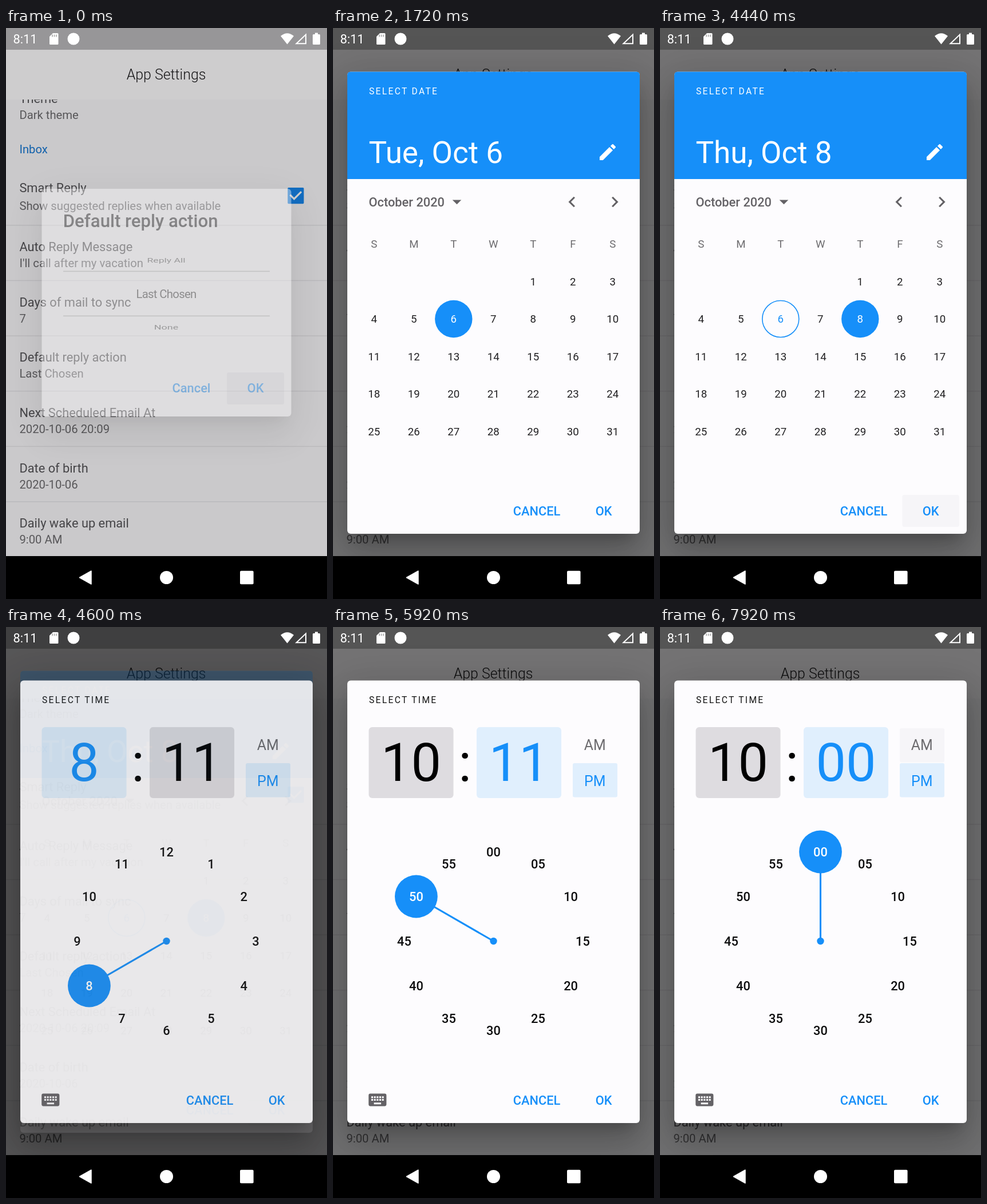
An HTML page for the animation above (8 s loop, 561 by 998 pixels).

```html
<!DOCTYPE html>
<html lang="en">
<head>
<meta charset="utf-8">
<title>Settings pickers</title>
<style>
  html, body { margin: 0; width: 100%; height: 100%; overflow: hidden; background: #000; }
  svg { display: block; width: 561px; height: 998px; font-family: Roboto, "Noto Sans", sans-serif; }
</style>
</head>
<body>
<svg id="stage" viewBox="0 0 561 998" xmlns="http://www.w3.org/2000/svg"></svg>
<script>
const LOOP = 8000, STEP = 40;
const DP = 561 / 360;
const BLUE = '#168ff9', PALE = '#e0effd', GREY = '#dedce0', PAPER = '#fdfcfe';
const INK = '#555457', SOFT = '#6c6b6e', ICON = '#646266', PRESSED = '#f6f5f8';
const HUB = { x: 280.5, y: 549 }, REACH = 156, KNOB = 24 * DP;
const stage = document.getElementById('stage');

const range = n => [...Array(n).keys()];
const many = (list, draw) => list.map(draw).join('');
const lerp = (a, b, p) => a + (b - a) * p;
const clamp = v => Math.min(1, Math.max(0, v));

const text = (x, y, str, size, fill, { weight = 400, anchor = 'start', gap = 0, extra = '' } = {}) =>
  `<text x="${x}" y="${y}" font-size="${size * DP}" fill="${fill}" font-weight="${weight}" text-anchor="${anchor}" letter-spacing="${gap}" ${extra}>${str}</text>`;
const mid = (x, y, str, size, fill, weight = 400) => text(x, y, str, size, fill, { weight, anchor: 'middle' });
const box = (x, y, w, h, fill, r = 0, extra = '') =>
  `<rect x="${x}" y="${y}" width="${w}" height="${h}" fill="${fill}" rx="${r}" ${extra}/>`;
const disc = (x, y, r, fill, extra = '') => `<circle cx="${x}" cy="${y}" r="${r}" fill="${fill}" ${extra}/>`;
const shape = (d, fill, extra = '') => `<path d="${d}" fill="${fill}" ${extra}/>`;
const icon = (x, y, d, fill) => shape(d, fill, `transform="translate(${x} ${y}) scale(${DP}) translate(-12 -12)"`);
const layer = (opacity, body) => opacity > 0 ? `<g opacity="${opacity}">${body}</g>` : '';
const scrim = opacity => box(0, 0, 561, 923, '#000', 0, `opacity="${opacity}"`);

// Elevation shadow made of three blurred layers, then the sheet itself.
function sheet(x, y, w, h, level = 1) {
  const shade = (name, drop, grow, alpha) =>
    box(x - grow, y - grow + drop, w + 2 * grow, h + 2 * grow, '#000', 8, `opacity="${alpha * level}" filter="url(#${name})"`);
  return shade('blurS', 17, -11, .2) + shade('blurM', 37, 5, .14) + shade('blurL', 14, 12, .12) + box(x, y, w, h, PAPER, 6);
}

const blur = (id, size) =>
  `<filter id="${id}" filterUnits="userSpaceOnUse" x="-150" y="-150" width="861" height="1300"><feGaussianBlur stdDeviation="${size}"/></filter>`;
const DEFS = `<defs>${blur('blurS', 12)}${blur('blurM', 30)}${blur('blurL', 36)}</defs>`;

const PENCIL = 'M3 17.25V21h3.75L17.81 9.94l-3.75-3.75L3 17.25zM20.71 7.04c.39-.39.39-1.02 0-1.41l-2.34-2.34c-.39-.39-1.02-.39-1.41 0l-1.83 1.83 3.75 3.75 1.83-1.83z';
const LEFT = 'M15.41 7.41L14 6l-6 6 6 6 1.41-1.41L10.83 12z';
const RIGHT = 'M10 6L8.59 7.41 13.17 12l-4.58 4.59L10 18l6-6z';
const key = (x, y) => `M${x} ${y}v2h2v-2z`;
const KEYBOARD = 'M4 5h16a2 2 0 0 1 2 2v10a2 2 0 0 1-2 2H4a2 2 0 0 1-2-2V7a2 2 0 0 1 2-2zM8 15v2h8v-2z' +
  many([5, 8, 11, 14, 17], x => key(x, 8) + key(x, 11));

const ROWS = [
  ['Auto Reply Message', "I'll call after my vacation"],
  ['Days of mail to sync', '7'],
  ['Default reply action', 'Last Chosen'],
  ['Next Scheduled Email At', '2020-10-06 20:09'],
  ['Date of birth', '2020-10-06'],
  ['Daily wake up email', '9:00 AM'],
];

function settings() {
  const title = (y, s) => text(23.4, y, s, 14, INK);
  const note = (y, s) => text(23.4, y, s, 13, SOFT);
  return box(0, 0, 561, 923, '#f8f7fa') +
    title(131, 'Theme') + note(159, 'Dark theme') + text(23.4, 219, 'Inbox', 13, '#1577d3') +
    title(287, 'Smart Reply') + note(318, 'Show suggested replies when available') +
    box(492.3, 279, 28.2, 28.2, '#1686ee', 1.6) +
    shape('M496.5 291.7l7 7 12.6-12.6', 'none', 'stroke="#fff" stroke-width="3.1"') +
    many(ROWS, ([name, value], i) => {
      const y = 96.65 * i;
      return box(0, 344 + y, 561, 1.5, '#e5e4e7') + title(390 + y, name) + note(418 + y, value);
    }) +
    box(0, 38, 561, 87, PAPER) + text(280, 90, 'App Settings', 16, '#1d1c1e', { weight: 300, anchor: 'middle' }) +
    box(0, 0, 561, 38, '#bab9bb');
}

function statusBar() {
  return text(12.5, 27, '8:11', 14, '#fff') +
    shape('M82 9h8q1.500 0 1.500 1.500v17q0 1.500-1.500 1.500h-12.500q-1.500 0-1.500-1.500v-12.500z', '#fff') +
    many([81, 84.5, 88], x => box(x - .8, 11.500, 1.7, 4, '#aaa')) +
    disc(118, 19, 10.5, '#fff') +
    shape('M491.500 28.500L480 14q11.500-9.500 23 0z', '#fff') +
    shape('M507.500 27.300H524V11.500z', 'none', 'stroke="#fff" stroke-width="2"') +
    shape('M540 8.500h5v2.500h2.500q1.500 0 1.500 1.500v15q0 1.500-1.500 1.500h-10q-1.500 0-1.500-1.500v-15q0-1.500 1.500-1.500h2.500z', '#fff');
}

function navBar() {
  return box(0, 923, 561, 75, '#000') +
    shape('M128.500 960.500L149 949v23z', '#fff', 'stroke="#fff" stroke-width="1.5" stroke-linejoin="round"') +
    disc(280.5, 960.5, 11.5, '#fff') + box(409, 948.7, 23.6, 23.6, '#fff', 2);
}

function replyDialog() {
  const wheel = (y, str, size, squash) =>
    `<g transform="translate(280 ${y}) scale(1 ${squash})">${mid(0, 0, str, size, '#555')}</g>`;
  return sheet(62.5, 281, 436, 398, .8) +
    text(99.7, 348, 'Default reply action', 20, '#222', { weight: 500 }) +
    wheel(409.5, 'Reply All', 11.3, .63) + wheel(526.5, 'None', 11.5, .63) +
    text(280, 472, 'Last Chosen', 13, '#333', { anchor: 'middle', gap: -.64 }) +
    box(100, 424.5, 361, 1.6, '#bbb') + box(100, 502.5, 361, 1.6, '#bbb') +
    box(386, 602, 100, 56, '#ecebee', 3) +
    mid(324, 637, 'Cancel', 14, BLUE, 500) + mid(436, 637, 'OK', 14, BLUE, 500);
}

const actions = y => mid(356, y, 'CANCEL', 14, BLUE, 500) + mid(473.2, y, 'OK', 14, BLUE, 500);

function datePicker(t) {
  const picked = t < 3240 ? 6 : 8;
  const column = i => 280.3 + (i - 3) * 69.5;
  const place = day => [column((day + 3) % 7), 443 + 65.45 * Math.floor((day + 3) / 7)];
  const ripple = t < 3240 ? 0 : .27 * clamp(1 - (t - 3240) / 160);
  const press = clamp((t - 4360) / 80);
  const [px, py] = place(picked), [tx, ty] = place(6);
  return sheet(25, 76.500, 511, 807.5) +
    shape('M25 264V82.500q0-6 6-6h499q6 0 6 6V264z', BLUE) +
    text(63, 115.5, 'SELECT DATE', 10, '#fff', { gap: 2.34 }) +
    text(62.5, 235.5, picked === 6 ? 'Tue, Oct 6' : 'Thu, Oct 8', 34, '#fff') +
    icon(480, 217, PENCIL, '#fff') +
    text(62.5, 312, 'October 2020', 14, ICON, { weight: 500 }) +
    icon(216.5, 303.5, 'M7 10l5 5 5-5z', ICON) + icon(417.7, 304, LEFT, ICON) + icon(492.4, 304, RIGHT, ICON) +
    many([...'SMTWTFS'], (d, i) => mid(column(i), 383.7, d, 12, SOFT)) +
    (picked === 6 ? '' : disc(tx, ty, 32, 'none', `stroke="${BLUE}" stroke-width="1.6"`)) +
    disc(px, py, 39, BLUE, `opacity="${ripple}"`) + disc(px, py, 32.7, BLUE) +
    many(range(31), i => {
      const day = i + 1, [x, y] = place(day);
      return mid(x, y + 6.7, day, 12, day === picked ? '#fff' : day === 6 ? BLUE : '#222123');
    }) +
    layer(press, box(423.3, 816, 99.7, 56, PRESSED, 4)) + actions(851.7);
}

// Standard fast-out-slow-in curve, cubic-bezier(.4, 0, .2, 1).
function ease(p) {
  const bez = (a, b, u) => 3 * a * u * (1 - u) ** 2 + 3 * b * u * u * (1 - u) + u ** 3;
  let lo = 0, hi = 1;
  for (let i = 0; i < 20; i++) {
    const u = (lo + hi) / 2;
    if (bez(.4, .2, u) < p) lo = u; else hi = u;
  }
  return bez(0, 1, lo);
}

function handAngle(t) {
  if (t < 5920) return 240;
  if (t < 6840) return lerp(300, 426, ease(clamp((t - 5920) / 200)));
  return 360;
}

function dial(t, minutes) {
  const angle = handAngle(t);
  const polar = deg => [HUB.x + REACH * Math.sin(deg * Math.PI / 180), HUB.y - REACH * Math.cos(deg * Math.PI / 180)];
  const [x, y] = polar(angle);
  const labels = fill => many(range(12), i => {
    const [lx, ly] = polar(i * 30);
    return mid(lx, ly + 7.75, minutes ? String(i * 5).padStart(2, '0') : i || 12, 14, fill, 500);
  });
  const past = (450 - angle + 360) % 30 * Math.PI / 180;
  return labels('#0c0c0d') +
    `<line x1="${HUB.x}" y1="${HUB.y}" x2="${x}" y2="${y}" stroke="${BLUE}" stroke-width="3.1"/>` +
    disc(HUB.x, HUB.y, 6.2, BLUE) + disc(x, y, KNOB, BLUE) +
    (past > .1 && past < .45 ? disc(x, y, 3.1, '#fff') : '') +
    `<clipPath id="knob">${disc(x, y, KNOB, '#000')}</clipPath><g clip-path="url(#knob)">${labels('#fff')}</g>`;
}

function timePicker(t) {
  const minutes = t >= 5920;
  const field = (x, value, active) =>
    box(x, 175, 148, 124, active ? PALE : GREY, 6) + mid(x + 74, 268.5, value, 60, active ? BLUE : '#000');
  return sheet(25, 93.5, 511, 773.5) +
    text(63, 132.5, 'SELECT TIME', 10, '#111', { gap: 2.34 }) +
    field(62.5, minutes ? '10' : '8', !minutes) + mid(230.5, 268.5, ':', 60, '#000') +
    field(251, t < 6840 ? '11' : '00', minutes) +
    layer(clamp((t - 7840) / 80), box(419, 177, 78, 59.5, PRESSED, 3)) +
    box(419, 238, 78, 59.5, PALE, 3) +
    mid(457.8, 215, 'AM', 16, SOFT) + mid(457.8, 278, 'PM', 16, BLUE) +
    dial(t, minutes) + icon(77.8, 826.5, KEYBOARD, ICON).replace('<path', '<path fill-rule="evenodd"') + actions(834.5);
}

function scene(t) {
  let body = settings();
  if (t < 40) body += scrim(.19) + layer(.4, replyDialog());
  if (t >= 1720 && t < 4720) {
    const out = t < 4600 ? 0 : (t - 4600) / 120;
    const leaving = t >= 4600;
    body += scrim(leaving ? lerp(.36, 0, out) : .54) + layer(leaving ? lerp(.35, 0, out) : 1, datePicker(t));
  }
  if (t >= 4600) {
    const p = clamp((t - 4600) / 120);
    body += scrim(lerp(.47, .54, p)) + layer(lerp(.87, 1, p), timePicker(t));
  }
  return DEFS + body + statusBar() + navBar();
}

let shown = '';
function frame() {
  const t = Math.floor(performance.now() % LOOP / STEP) * STEP;
  const markup = scene(t);
  if (markup !== shown) stage.innerHTML = shown = markup;
  requestAnimationFrame(frame);
}
frame();
</script>
</body>
</html>
```
